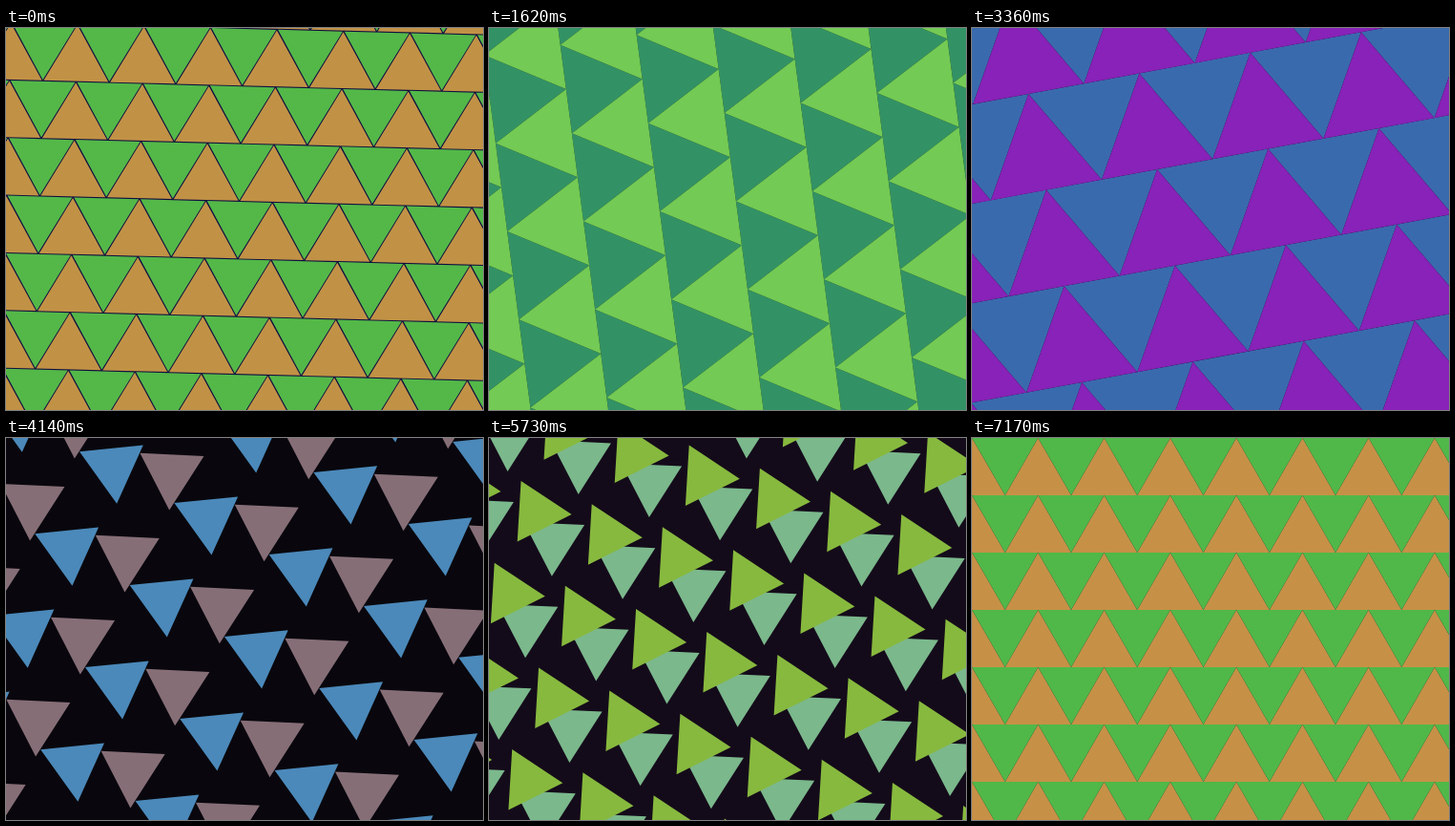
These frames come from a looping animation (500x400 px, 7200 ms). An HTML page with a canvas:

```html
<!DOCTYPE html>
<html>
<head>
<meta charset="utf-8">
<style>
  html, body { margin: 0; width: 100%; height: 100%; overflow: hidden; }
  canvas { display: block; }
</style>
</head>
<body>
<canvas id="stage" width="500" height="400"></canvas>
<script>
const ctx = document.getElementById('stage').getContext('2d');
const STEPS = 240, STEP_MS = 30;
const PHASE = 60, MOVE = 53;   // each phase moves, then rests
const H = 60, W = 2 * H / Math.sqrt(3);

// Colours fade between these steps of the loop.
const stops = [0, 31, 80, 113, 165, 220, 240];
const upColors = ['#c69146', '#38ac30', '#2c769c', '#3a6aae', '#5ca8c6', '#9cc850', '#c69146'];
const downColors = ['#50b848', '#a8c450', '#3cd058', '#8822b8', '#84ba36', '#8ab846', '#50b848'];
const backColors = ['#100c40', '#101c24', '#0c1810', '#0a0a0e', '#08040c', '#201228', '#100c40'];

function fade(colors, n) {
  const i = stops.findIndex(s => s >= n);
  const t = (n - stops[i - 1]) / (stops[i] - stops[i - 1]);
  const rgb = [1, 3, 5].map(p => {
    const [a, b] = [colors[i - 1], colors[i]].map(c => parseInt(c.slice(p, p + 2), 16));
    return Math.round(a + (b - a) * t);
  });
  return `rgb(${rgb})`;
}

// One layer of equal triangles on a rectangular lattice.
function layer(x0, y0, radius, angle, color) {
  const corners = [0, 1, 2].map(i => {
    const a = (angle + i * 120) * Math.PI / 180;
    return [radius * Math.cos(a), radius * Math.sin(a)];
  });
  ctx.beginPath();
  for (let k = -3; k <= 11; k++) {
    for (let m = -3; m <= 12; m++) {
      const x = x0 + k * W, y = y0 + m * H;
      corners.forEach(([cx, cy], i) => ctx[i ? 'lineTo' : 'moveTo'](x + cx, y + cy));
      ctx.closePath();
    }
  }
  ctx.fillStyle = color;
  ctx.fill();
}

function draw(n) {
  const phase = Math.floor(n / PHASE) % 4;
  const t = n === STEPS ? 0 : Math.min(1, n % PHASE / MOVE);
  const swing = (phase % 2 ? 1 : -1) * (1 - Math.cos(Math.PI * t)) / 2;
  const sideways = phase === 0 || phase === 3;
  const dx = sideways ? swing * W : 0, dy = sideways ? 0 : swing * H;
  const radius = H * 2 / 3 * (1 - .45 * Math.sin(Math.PI * t));
  const zoom = 1 + .75 * (1 - Math.abs(n - 120) / 120);

  ctx.setTransform(1, 0, 0, 1, 0, 0);
  ctx.fillStyle = fade(backColors, n);
  ctx.fillRect(0, 0, 500, 400);
  ctx.translate(250, 200);
  ctx.rotate(n * 2 * Math.PI / STEPS);
  // The lattice grows from a point above the top left corner.
  ctx.translate(-250, -280);
  ctx.scale(zoom, zoom);
  layer(dx, dy, radius, 120 * swing - 90, fade(upColors, n));
  layer(W / 2 - dx, -H / 3 - dy, radius, 90 - 120 * swing, fade(downColors, n));
}

const start = performance.now();
function tick() {
  const time = Math.max(0, performance.now() - start);
  draw(Math.floor(time / STEP_MS) % STEPS + 1);
  requestAnimationFrame(tick);
}
tick();
</script>
</body>
</html>
```
